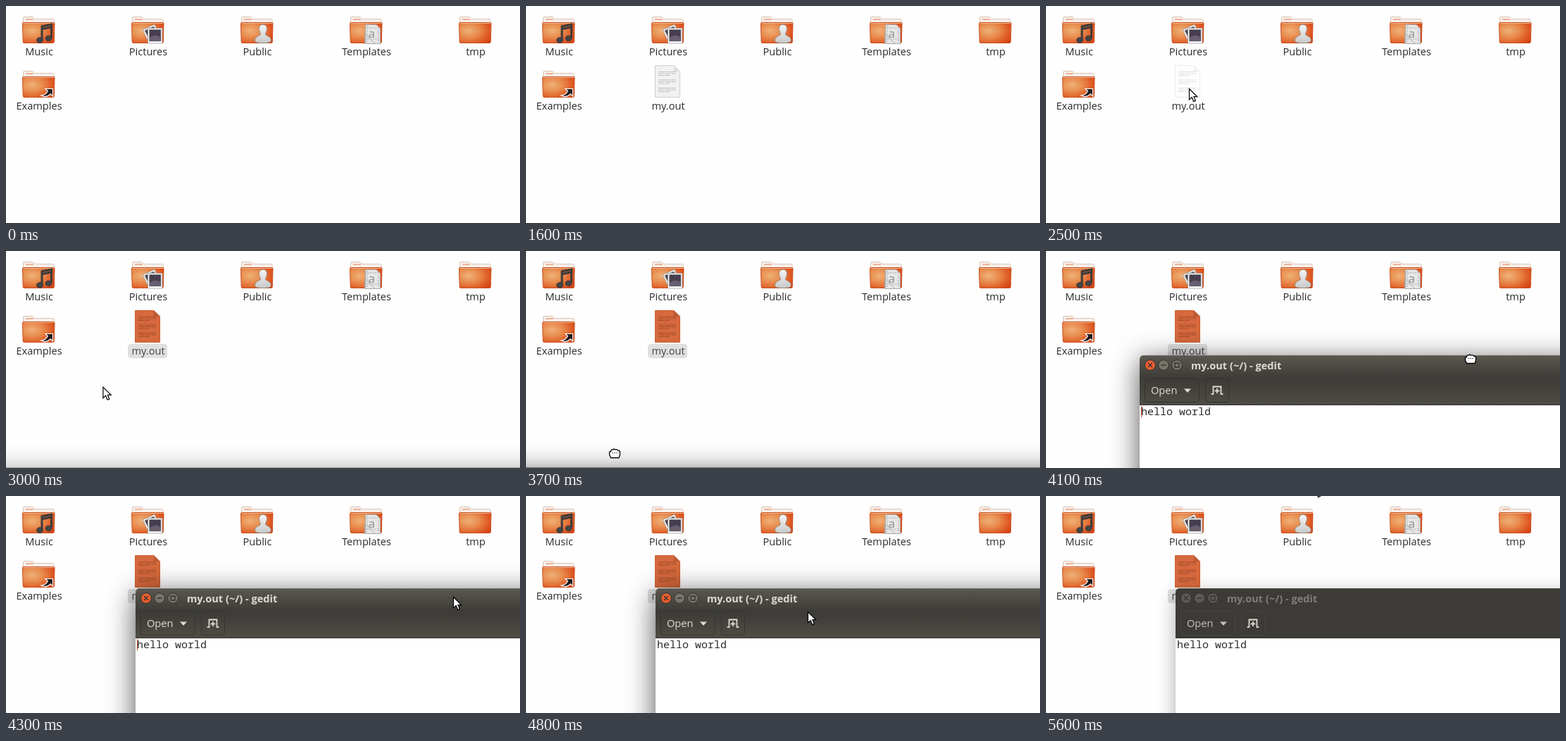
An HTML page for the animation above (5700 ms loop, 730 by 308 pixels).

```html
<!DOCTYPE html>
<html lang="en">
<head>
<meta charset="utf-8">
<title>Opening a text file</title>
<style>
html, body { margin: 0; width: 100%; height: 100%; overflow: hidden; background: #fefefe; }
svg { display: block; width: 730px; height: 308px; }
text { font: 500 14.6px "Open Sans", "Noto Sans", sans-serif; fill: #2b2b2b; white-space: pre; }
.label { text-anchor: middle; }
#title { font-weight: bold; }
.mono { font: 15px "Noto Sans Mono", "DejaVu Sans Mono", monospace; }
</style>
</head>
<body>
<svg viewBox="0 0 730 308">
  <defs>
    <radialGradient id="front" cx=".3" cy=".4" r=".85">
      <stop stop-color="#efb177"/><stop offset=".4" stop-color="#e88a4c"/><stop offset=".75" stop-color="#de5a24"/><stop offset="1" stop-color="#d43f10"/>
    </radialGradient>
    <linearGradient id="bar" x2="0" y2="1">
      <stop stop-color="#5a584f"/><stop offset=".43" stop-color="#3f3d39"/><stop offset=".5" stop-color="#3d3c38"/><stop offset="1" stop-color="#4f4d45"/>
    </linearGradient>
    <linearGradient id="person" x2="0" y2="1">
      <stop stop-color="#f6f6f6"/><stop offset="1" stop-color="#c9c9c9"/>
    </linearGradient>
    <g id="folder">
      <path d="M1.5 11V3Q1.5 1.5 3 1.5H15L18 4.5H43.5Q45 4.5 45 6V11Z" fill="#f8f1ec" stroke="#d9c3b6"/>
      <path d="M5 5H16" stroke="#e79a70" stroke-width="1.4"/>
      <path d="M.5 11Q.5 9.5 2 9.5H44.5Q46 9.5 46 11L45.3 37Q45.2 38.5 43.5 38.5H3Q1.3 38.5 1.2 37Z" fill="url(#front)" stroke="#c9501f"/>
      <path d="M1.5 10.5H45" stroke="#f3b78c"/>
    </g>
    <g id="music" fill="#444" stroke="#3b3b3b">
      <path d="M28 34V15L41.5 12V31M27 19L43 15.5" fill="none" stroke-width="3"/>
      <ellipse cx="25" cy="34.5" rx="4.5" ry="3.8"/>
      <ellipse cx="37.5" cy="32" rx="4.5" ry="3.8"/>
    </g>
    <g id="pictures" stroke="#8d8d8d" stroke-width=".7">
      <path d="M16 20L33 12L42 31L25 38Z" fill="#f4f4f4"/>
      <path d="M19 21L32 15L38 29L26 34Z" fill="#4a4350"/>
      <path d="M23.5 17.5H44V39H23.5Z" fill="#fff"/>
      <path d="M25.5 19.5H42V36H25.5Z" fill="#463f50"/>
      <path d="M26 35.5V31Q34 25 41.5 30V35.5Z" fill="#685e70" stroke="none"/>
    </g>
    <path id="public" d="M32 12.5C36.5 12.5 38 16 37.3 20C37 23 35.5 24 35.3 26C36 28.5 43.5 29 43.5 35Q43.5 38.5 32 38.5T20.5 35C20.5 29 28 28.5 28.7 26C28.5 24 27 23 26.7 20C26 16 27.5 12.5 32 12.5Z" fill="url(#person)" stroke="#888" stroke-width=".8"/>
    <g id="templates" fill="none" stroke="#a9a9a9">
      <path d="M22.5 12.5H38L43.5 18V39.5H22.5Z" fill="#e6e6e6"/>
      <path d="M25 14V38M41 20V38M22 17H42M22 33H43" stroke-dasharray="2 1.5"/>
      <text x="26.5" y="31" style="font-size:17px;fill:#8d8d8d;stroke:none">a</text>
      <path d="M21.5 25V39.5H36Z"/>
    </g>
    <path id="link" d="M33 26.5H43.5V37L40.2 33.8Q34 40 27 36Q33 36 36.3 29.8Z" fill="#1c1c1c" stroke="#fff" stroke-width="1.2"/>
  </defs>

  <g id="desk"></g>

  <g id="file">
    <path id="page" d="M183.5 84.5H210L218.5 93V129.5H183.5Z"/>
    <path id="fold" d="M210 84.5V93H218.5Z"/>
    <path id="lines" stroke-dasharray="8 .7"/>
    <rect id="chip" x="173" y="132" width="56" height="20" rx="4"/>
    <text id="name" class="label" x="202" y="147">my.out</text>
  </g>

  <g id="win">
    <rect id="shadow" y="8" width="1300" height="700"/>
    <path d="M0 71H1300V700H0Z" fill="#fff"/>
    <path id="head" d="M0 71V6Q0 0 6 0H1300V71Z"/>
    <path id="edge" d="M1 6Q1 .5 6 .5H1300" fill="none"/>
    <path d="M0 70.5H1300" stroke="#33322e"/>
    <g id="buttons" stroke="#33322e"></g>
    <text id="title" x="73" y="20">my.out (~/) - gedit</text>
    <g id="tools" fill="none">
      <rect x="7.5" y="32.5" width="77" height="34" rx="4"/>
      <rect x="93.5" y="32.5" width="33" height="34" rx="4"/>
    </g>
    <g id="ink">
      <text x="16" y="55" style="fill:inherit">Open</text>
      <path d="M63 47.5H73L68 53Z"/>
      <path d="M101.5 55.2H104.5V44.5H115.5V55.2H118.5M110 47V54M106.7 50.5H113.3" fill="none" stroke="#dfdbd2" stroke-width="1.8"/>
    </g>
    <text class="mono" x="2" y="85">hello world</text>
    <path id="caret" d="M2.5 72V88" stroke="#c8451c"/>
  </g>

  <path id="arrow" d="M.5 .5V16L4.2 12.6L6.7 18.6L9.4 17.5L7 11.7H11.8Z" fill="#fff" stroke="#000" stroke-width="1.2"/>
  <path id="hand" d="M-5.5 5.5L-7.5 1V-2Q-7.5-3.5-5.5-3.5Q-5.5-6.5-3-6Q-1-7.5 1-6Q3-7 4.5-5Q7.5-5 7.5-2V1L6 5.5ZM-3-2V-1M0-2V-1M3-2V-1" fill="#fff" stroke="#000" stroke-width="1.3"/>
</svg>
<script>
const $ = id => document.getElementById(id);
const set = (id, attrs) => { for (const k in attrs) $(id).setAttribute(k, attrs[k]); };
const show = (id, on) => $(id).style.display = on ? "" : "none";
const place = (id, [x, y]) => set(id, { transform: `translate(${x} ${y})` });

const folders = [["Music", "music"], ["Pictures", "pictures"], ["Public", "public"],
  ["Templates", "templates"], ["tmp"], ["Examples", "link"]];
$("desk").innerHTML = folders.map(([name, emblem], i) => {
  const x = 23 + i % 5 * 155, y = i < 5 ? 14 : 91;
  return `<g transform="translate(${x} ${y})"><use href="#folder"/>` +
    (emblem ? `<use href="#${emblem}"/>` : "") +
    `<text class="label" x="24" y="56">${name}</text></g>`;
}).join("");

// Three paragraphs of three lines, the last one short.
let lines = "";
for (let i = 0; i < 9; i++)
  lines += `M188 ${93.5 + i * 2.5 + Math.floor(i / 3) * 4}h${i % 3 == 2 ? 16 : 25}`;
set("lines", { d: lines });

const glyphs = ["M12 11L18 17M18 11L12 17", "M30.5 14H37.5", "M50 11H56V17H50Z"];
$("buttons").innerHTML = glyphs.map((d, i) =>
  `<circle cx="${15 + 19 * i}" cy="14" r="7.3"/><path d="${d}" fill="none" stroke-width="1.4"/>`).join("");
const disks = document.querySelectorAll("#buttons circle");

// Stops on each path: [ms, x, y].
const pointer = [[1800, 652, 286], [2500, 203, 117], [2900, 203, 117], [3300, 53, 290],
  [3400, 60, 312], [4300, 635, 143], [4500, 635, 143], [4800, 400, 164], [5100, 383, 15], [5600, 380, -17]];
const grip = [[3700, 126, 288], [3900, 427, 186], [4100, 603, 154], [4300, 640, 147]];
const frame = [[3700, -344, 307], [3900, -43, 182], [4100, 133, 148], [4300, 184, 131]];

// Position at time t; a power above 1 slows down towards each stop.
function at(stops, t, power = 1) {
  const i = stops.findIndex(s => s[0] >= t);
  const b = stops.at(i), a = i > 0 ? stops[i - 1] : b;
  const p = a === b ? 1 : 1 - ((b[0] - t) / (b[0] - a[0])) ** power;
  return [1, 2].map(n => a[n] + (b[n] - a[n]) * p);
}

function drawFile(t) {
  const picked = t >= 2700, focus = t < 2900, hover = t >= 2400;
  const pick = (orange, light, plain) => picked ? orange : hover ? light : plain;
  show("file", t >= 1600);
  set("page", { fill: pick("#d6693d", "#fdfdfd", "#f1f1f1"), stroke: pick("#c8602f", "#ececec", "#cfcfcf") });
  set("fold", { fill: pick("#bb5a35", "#f2f2f2", "#ddd") });
  set("lines", { stroke: pick("#a34c2c", "#dedede", "#bdbdbd") });
  set("chip", { fill: !picked ? "none" : focus ? "#f07746" : "#e0e0e0" });
  $("name").style.fill = !picked ? "#2b2b2b" : focus ? "#fff" : "#444";
}

function drawWindow(t) {
  const active = t < 5500;
  const pick = (on, off) => active ? on : off;
  show("win", t >= 2900);
  set("win", { opacity: Math.min(1, (t - 2800) / 300) });
  place("win", at(frame, t));
  $("shadow").style.cssText = pick("filter:blur(20px);opacity:.68", "filter:blur(14px);opacity:.32");
  set("head", { fill: pick("url(#bar)", "#3c3b37") });
  set("edge", { stroke: pick("#6b695f", "#45443f") });
  $("title").style.fill = pick("#dfdbd2", "#807d78");
  disks.forEach((c, i) => c.setAttribute("fill", pick(i ? "#77746a" : "#ec5f31", "#5d5b55")));
  set("tools", { stroke: pick("#353430", "#45443f") });
  set("ink", { fill: pick("#dfdbd2", "#c4c1b9") });
  show("caret", active && (t < 4600 || t >= 5000));
}

function draw() {
  const t = Math.floor(performance.now() % 5700 / 100) * 100;
  const dragging = t >= 3700 && t < 4300;
  drawFile(t);
  drawWindow(t);
  show("arrow", t >= 1800 && !dragging);
  show("hand", dragging);
  place("arrow", at(pointer, t, 2));
  place("hand", at(grip, t));
  requestAnimationFrame(draw);
}
draw();
</script>
</body>
</html>
```
